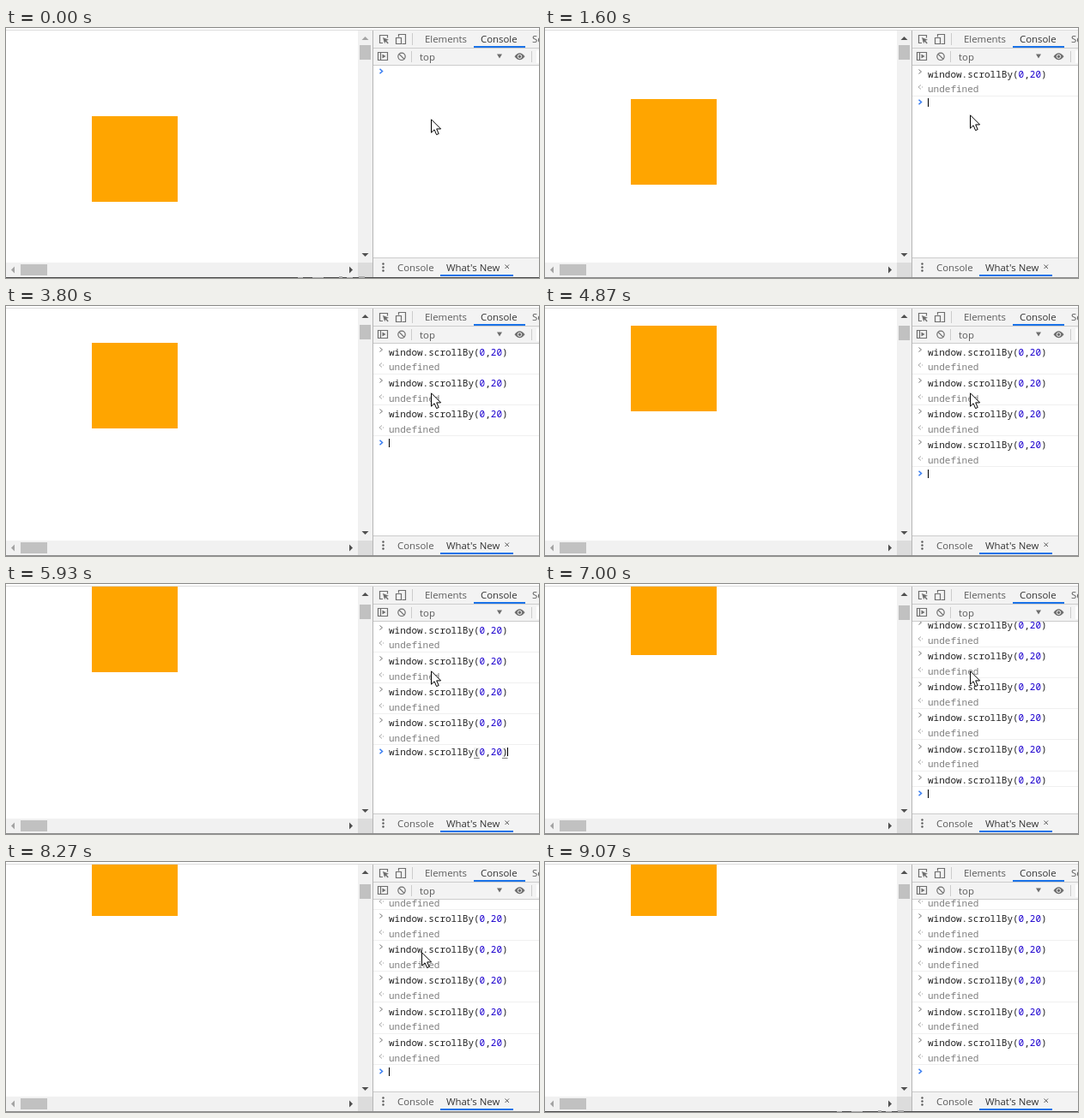
Recreate the animation shown at these times as an HTML page. Size 621 by 292 pixels, loop 9.27 s.

```html
<!DOCTYPE html>
<html lang="en">
<head>
<meta charset="utf-8">
<title>scrollBy in the console</title>
<style>
  html, body { margin: 0; width: 100%; height: 100%; overflow: hidden; background: #fff; }
  svg { display: block; }
  text { white-space: pre; }
  .ui { font: 11.4px "Open Sans", "Noto Sans", sans-serif; fill: #5a5a5a; }
  .ui .active { fill: #333; }
  .code { font: 11px "Noto Sans Mono", "DejaVu Sans Mono", monospace; fill: #222; }
  .number { fill: #1c00cf; }
  .result { fill: #808080; }
  .line { fill: none; stroke: #6e6e6e; stroke-width: 1.2; }
</style>
</head>
<body>
<svg width="621" height="292" viewBox="0 0 621 292">
  <defs>
    <clipPath id="pageClip"><rect y="3" width="410" height="271"/></clipPath>
    <clipPath id="consoleClip"><rect x="428" y="44" width="193" height="224"/></clipPath>
  </defs>

  <rect width="621" height="292" fill="#fff"/>
  <rect y="2" width="621" height="1" fill="#dcdcdc"/>

  <g clip-path="url(#pageClip)"><rect id="box" x="100" width="100" height="100" fill="#ffa500"/></g>

  <!-- scrollbars -->
  <path d="M410 3h17v271h-17zM0 274h410v17H0z" fill="#f1f1f1"/>
  <rect x="410" y="274" width="17" height="17" fill="#dcdcdc"/>
  <rect id="thumb" x="412" width="13" height="17" fill="#c1c1c1"/>
  <rect x="17" y="276" width="31" height="13" fill="#c1c1c1"/>
  <path id="upArrow" d="M414.5 14h8l-4-4z"/>
  <path d="M414.5 263h8l-4 4zM400 278.5v8l4-4z" fill="#505050"/>
  <path d="M10 278.5v8l-4-4z" fill="#a3a3a3"/>

  <!-- developer tools -->
  <path d="M428 3h193v40H428zM428 269h193v22H428z" fill="#f3f3f3"/>
  <path d="M428 23h193v1H428zM428 43h193v1H428zM428 268h193v1H428zM473 6h1v14h-1zM472 27h1v13h-1zM612 27h1v13h-1z" fill="#ccc"/>
  <rect x="427" y="3" width="1" height="288" fill="#b5b5b5"/>
  <path d="M545 21h60v2h-60zM506 288h85v2h-85z" fill="#1a73e8"/>
  <rect x="618" y="26" width="3" height="15" fill="#fff"/>
  <path class="line" d="M439 17.5h-3.5v-9h9v3M457.5 10.5v-3h8v11h-4M454.5 11.5h6v7h-6z"/>
  <path d="M439 11l7 2.8-2.8 1 2.5 2.6-1 1-2.6-2.6-1 2.4z" fill="#6e6e6e"/>
  <path class="line" d="M433.5 28.5h11v9h-11zM436.5 28.5v9"/>
  <path d="M438.5 30.5v5l4-2.5zM572 30.5h6l-3 5z" fill="#6e6e6e"/>
  <circle class="line" cx="461" cy="33.3" r="4.2"/>
  <path class="line" d="M458 30.3l6 6"/>
  <path d="M592.5 33.3q6-8 12 0q-6 8-12 0z" fill="#6e6e6e"/>
  <circle cx="598.5" cy="33.3" r="2.2" fill="#6e6e6e" stroke="#f3f3f3"/>
  <g fill="#5a5a5a">
    <circle cx="439.5" cy="275.5" r="1.2"/><circle cx="439.5" cy="279.5" r="1.2"/><circle cx="439.5" cy="283.5" r="1.2"/>
  </g>
  <g class="ui">
    <text x="488" y="17">Elements</text>
    <text class="active" x="553" y="17">Console</text>
    <text x="613" y="17">Sources</text>
    <text x="482" y="38">top</text>
    <text x="456" y="284">Console</text>
    <text class="active" x="513" y="284">What's New</text>
  </g>
  <path d="M581.5 276.5l4.5 4.5M586 276.5l-4.5 4.5" stroke="#5a5a5a" fill="none"/>

  <g clip-path="url(#consoleClip)">
    <g id="log" class="code"></g>
    <g id="prompt">
      <path d="M435.5 1.8l3 2.7-3 2.7" fill="none" stroke="#367cf1" stroke-width="1.5"/>
      <g id="typed" class="code">
        <path d="M545 0h6.6v12h-6.6zM578 0h6.6v12H578z" fill="#eee"/>
        <path d="M545 12h6.6v1h-6.6zM578 12h6.6v1H578z" fill="#888"/>
      </g>
      <rect id="caret" width="1" height="10" fill="#000"/>
    </g>
  </g>

  <rect id="edge" y="291" width="621" height="1"/>
  <path id="taskbar" d="M340 291h6v1h-6zM357 291h13v1h-13zM388 290h4v2h-4zM397 291h7v1h-7zM411 290h7v2h-7z" fill="#aaa"/>
  <path id="pointer" d="M.5.8v15.4l3.6-3.4 2.5 5.8 2.6-1.1-2.5-5.6h4.9z" fill="#fff" stroke="#000"/>
</svg>
<script>
const LOOP = 9270, BLINK = 530, PITCH = 36.2, HALF = 18.1;
const PROMPT_LIMIT = 239.5;
const typedAt = [870, 2070, 3330, 4400, 5470, 6530, 7400];
const scrolledAt = [1600, 2530, 3800, 4870, 5930, 7000, 7730];
const echoedAt = [1600, 2600, 3800, 4870, 6000, 7000, 7800];
const answeredAt = [1600, 2670, 3800, 4870, 6000, 7070, 7870];

const $ = id => document.getElementById(id);
const past = (times, t) => times.filter(time => time <= t).length;
const show = (el, on) => el.setAttribute('visibility', on ? 'inherit' : 'hidden');
const moveTo = (el, x, y) => el.setAttribute('transform', `translate(${x} ${y})`);

const command = y => `<text x="446" y="${y}">window.scrollBy(<tspan class="number">0</tspan>,<tspan class="number">20</tspan>)</text>`;
$('typed').insertAdjacentHTML('beforeend', command(9));

$('log').innerHTML = typedAt.map(() => `
  <g>${command(4)}<path d="M435.5-5.5l3 2.5-3 2.5" fill="none" stroke="#777"/></g>
  <g><text class="result" x="446" y="4">undefined</text>
    <path d="M438-4.5l-3 2.5 3 2.5M439-2h1.2" fill="none" stroke="#aaa"/></g>
  <rect x="428" width="193" height="1" fill="#f0f0f0"/>`).join('');
const parts = [...$('log').children];

function drawConsole(t) {
  const echoed = past(echoedAt, t), answered = past(answeredAt, t);
  const typing = past(typedAt, t) > echoed;
  const pending = echoed > answered ? HALF : 0;
  const end = 46 + PITCH * echoed - pending;
  const scroll = Math.max(0, end - PROMPT_LIMIT);

  typedAt.forEach((_, i) => {
    const [input, output, rule] = parts.slice(i * 3, i * 3 + 3);
    const top = PITCH * i - scroll;
    const cut = i < answered ? 0 : HALF;
    moveTo(input, 0, Math.floor(54 + top));
    moveTo(output, 0, Math.floor(71.8 + top));
    moveTo(rule, 0, Math.floor(79 + top - cut));
    show(input, i < echoed);
    show(output, i < answered);
    show(rule, i < echoed);
  });

  const y = scroll && typing ? Math.floor(PROMPT_LIMIT) : Math.round(end - scroll);
  moveTo($('prompt'), 0, y);
  show($('typed'), typing);
  const lastInput = Math.max(270, ...[...typedAt, ...echoedAt].filter(time => time <= t));
  const lit = Math.floor((t - lastInput) / BLINK) % 2 === 0;
  show($('caret'), t >= 270 && t < 9070 && lit);
  $('caret').setAttribute('x', typing ? 584 : 446);
}

function drawPage(t) {
  const count = past(scrolledAt, t);
  $('box').setAttribute('y', 103 - 20 * count);
  $('thumb').setAttribute('y', 20 + Math.floor(0.9 * count));
  $('upArrow').setAttribute('fill', count ? '#505050' : '#a3a3a3');
}

function drawPointer(t) {
  const step = t < 8270 ? 0 : Math.min(11, 1 + Math.floor((t - 8270) / 66));
  const p = step / 11, eased = p * p * (3 - 2 * p);
  const startY = t < 70 ? 106 : t < 130 ? 102 : 101;
  moveTo($('pointer'), Math.round(495 - 458 * eased), Math.round(startY + 192 * eased));
}

function draw() {
  const t = performance.now() % LOOP;
  const outside = t < 70 || t >= 9070;
  drawPage(t);
  drawConsole(t);
  drawPointer(t);
  $('edge').setAttribute('fill', outside ? '#4a4a4a' : '#8c8c8c');
  show($('taskbar'), outside);
  requestAnimationFrame(draw);
}
draw();
</script>
</body>
</html>
```
